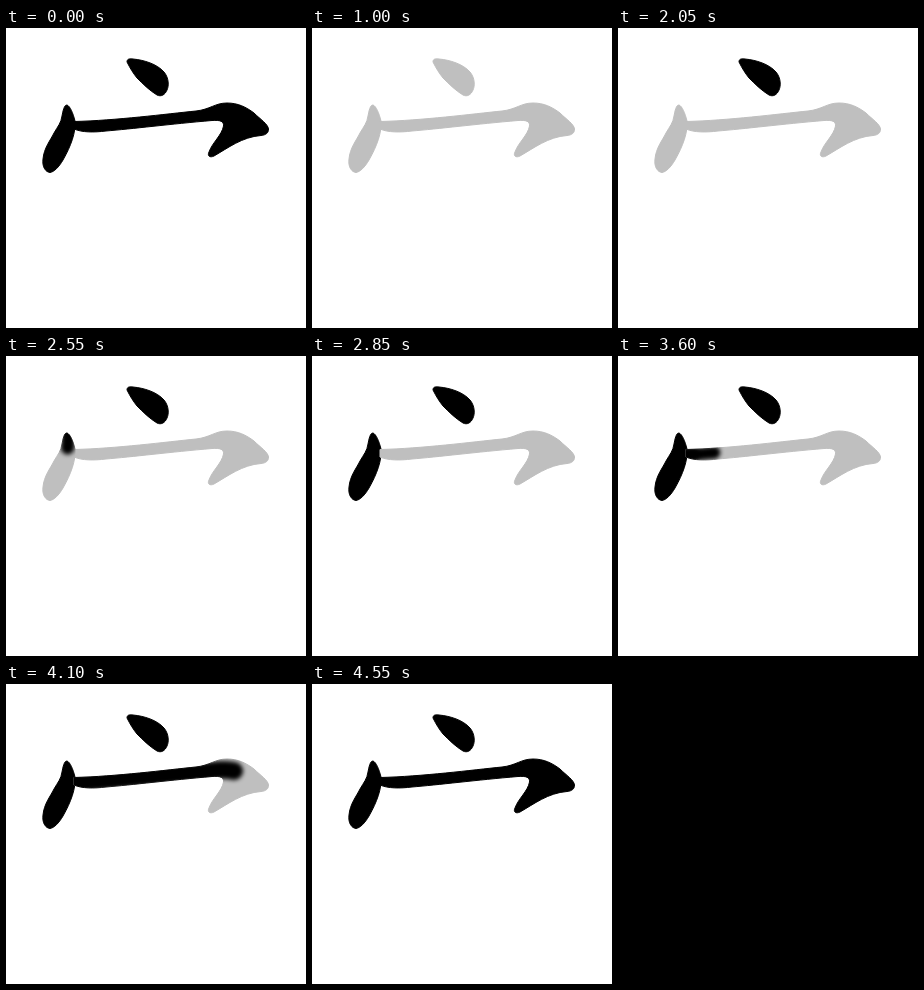
An HTML page for the animation above (5.55 s loop, 300 by 300 pixels).

```html
<!DOCTYPE html>
<html lang="en">
<head>
<meta charset="utf-8">
<title>Stroke order</title>
<style>
  html, body { margin: 0; width: 100%; height: 100%; overflow: hidden; background: #fff; }
  svg { display: block; width: 100%; height: 100%; }
</style>
</head>
<body>
<svg id="stage" viewBox="0 0 300 300">
  <filter id="soft" filterUnits="userSpaceOnUse" x="0" y="0" width="300" height="300">
    <feGaussianBlur stdDeviation="2"/>
  </filter>
</svg>
<script>
const LOOP = 5550, CLEAR = 1000, STEP = 100;

// A stroke is painted in legs: the brush follows a path in equal steps while its width grows.
const strokes = [
  {
    outline: 'M121 34C121 31 123 30.5 127 31C138 32 151 36 158 44C163 50 163 58 161 62C159 67 155 69 151 67C144 63 136 55 131 50C127 45 124 40 121 34Z',
    legs: [{ start: 1750, steps: 4, path: 'M118 27L158 67', thin: 7, thick: 26 }]
  },
  {
    outline: 'M61 77C64 78 67 85 69 93C70 104 65 118 57 132C53 139 48 144 44 144.5C39 144 36 138 37 131C38 120 44 113 48 105C52 98 55 95 56 88C57 83 58 77 61 77Z',
    legs: [{ start: 2550, steps: 4, path: 'M62 76Q64 106 46 136', thin: 10, thick: 24 }]
  },
  {
    outline: 'M68 93.5C110 92.5 160 86 190 83C204 81.5 209 75 221 75C232 75 240 79 248 85C254 91 262 96 262.5 101C262.5 105 260 107 255 107.5C236 109 222 120 208 128C204 130 201 128 203 124C206 115 216 107 217.5 98C218 93 214 92 206 92.5C165 96 125 101 100 103C88 104.5 76 104.5 68 101Z',
    legs: [
      { start: 3350, steps: 2, path: 'M64 98H76', thin: 12, thick: 12 },
      { start: 3600, steps: 7, path: 'M70 99L205 87Q230 82 252 98', thin: 11, thick: 19 },
      { start: 4350, steps: 3, path: 'M252 98L210 122', thin: 20, thick: 24 }
    ]
  }
];

const stage = document.getElementById('stage');

function add(parent, tag, attributes) {
  const node = document.createElementNS('http://www.w3.org/2000/svg', tag);
  set(node, attributes);
  return parent.appendChild(node);
}

function set(node, attributes) {
  for (const name in attributes) node.setAttribute(name, attributes[name]);
}

for (const stroke of strokes)
  stroke.shape = add(stage, 'path', { d: stroke.outline });

strokes.forEach(({ outline, legs }, i) => {
  const mask = add(stage, 'mask', {
    id: 'mask' + i, maskUnits: 'userSpaceOnUse', x: 0, y: 0, width: 300, height: 300
  });
  add(mask, 'path', { d: outline, fill: '#fff', stroke: '#fff' });
  const group = add(stage, 'g', { mask: `url(#mask${i})` });
  for (const leg of legs)
    leg.brush = add(group, 'path', {
      d: leg.path, pathLength: 1, fill: 'none', stroke: '#000',
      'stroke-linecap': 'round', 'stroke-linejoin': 'round', filter: 'url(#soft)'
    });
});

function progress({ start, steps }, time) {
  const taken = Math.floor((time - start) / STEP) + 1;
  return Math.max(0, Math.min(1, taken / steps));
}

function draw(time) {
  for (const { shape, legs } of strokes) {
    const solid = time < CLEAR || legs.every(leg => progress(leg, time) === 1);
    const color = solid ? '#000' : '#bfbfbf';
    set(shape, { fill: color, stroke: color });
    for (const leg of legs) {
      const done = progress(leg, time);
      set(leg.brush, {
        'stroke-dasharray': `${done} 2`,
        'stroke-width': leg.thin + (leg.thick - leg.thin) * done,
        visibility: solid || !done ? 'hidden' : 'visible'
      });
    }
  }
}

const begin = performance.now();
function frame() {
  draw((performance.now() - begin) % LOOP);
  requestAnimationFrame(frame);
}
frame();
</script>
</body>
</html>
```
